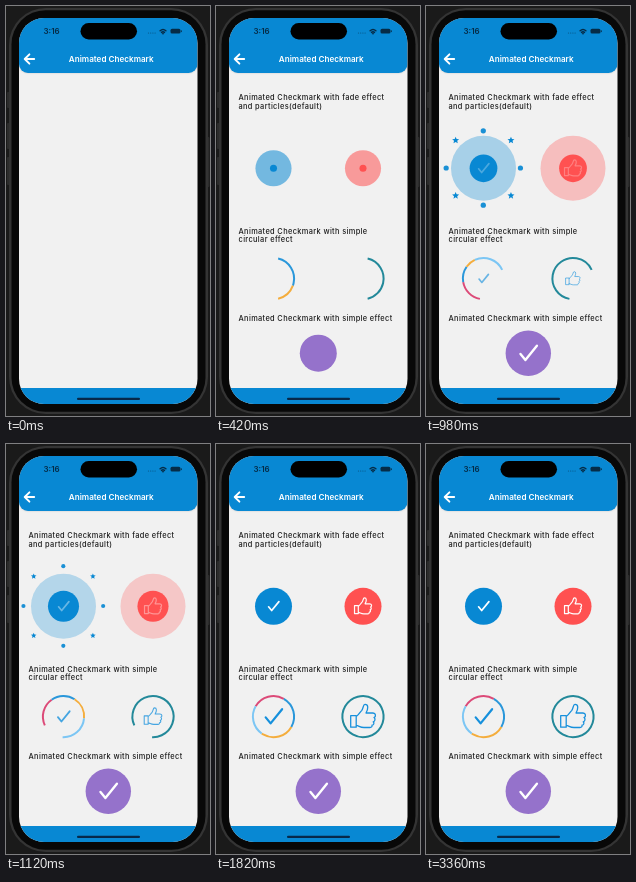
An HTML page with a canvas for the animation above (4.34 s loop, 204 px wide and 410 px high).

```html
<!DOCTYPE html>
<html lang="en">
<head>
<meta charset="utf-8">
<title>Animated Checkmark</title>
<style>
html, body { margin: 0; width: 100%; height: 100%; overflow: hidden; background: #1a1a1a; }
canvas { display: block; width: 204px; height: 410px; filter: blur(.4px); }
</style>
</head>
<body>
<canvas id="stage"></canvas>
<script>
const W = 204, H = 410, LOOP = 4340, STEP = 140, START = 280;
const BLUE = '#0888d3', RED = '#ff5151', PURPLE = '#9572cb', TEAL = '#23899a', ICON = '#1690dc';
const SKY = '#7cc6f4', ORANGE = '#f4ad3d', PINK = '#dc4a78', AZURE = '#2a97da';

const canvas = document.getElementById('stage');
const ctx = canvas.getContext('2d');
const dpr = window.devicePixelRatio || 1;
canvas.width = W * dpr;
canvas.height = H * dpr;

const clamp = v => Math.max(0, Math.min(1, v));
const easeOut = p => 1 - (1 - clamp(p)) ** 2;
const rad = deg => deg * Math.PI / 180;

// Linear interpolation over values spaced 280 ms apart
function track(t, values) {
  const p = clamp((t - 420) / 840) * (values.length - 1);
  const i = Math.min(Math.floor(p), values.length - 2);
  return values[i] + (values[i + 1] - values[i]) * (p - i);
}

function box(x, y, w, h, r, color) {
  ctx.beginPath();
  ctx.roundRect(x, y, w, h, r);
  ctx.fillStyle = color;
  ctx.fill();
}

function disc(x, y, r, color, alpha = 1) {
  if (r <= 0 || alpha <= 0) return;
  ctx.globalAlpha = alpha;
  ctx.beginPath();
  ctx.arc(x, y, r, 0, Math.PI * 2);
  ctx.fillStyle = color;
  ctx.fill();
  ctx.globalAlpha = 1;
}

function label(str, x, y, font, color, spacing = 0, align = 'left') {
  ctx.font = font + ' Inter, Roboto, sans-serif';
  ctx.letterSpacing = spacing + 'px';
  ctx.textAlign = align;
  ctx.fillStyle = color;
  ctx.fillText(str, x, y);
}

function pen(color, width) {
  ctx.strokeStyle = color;
  ctx.lineWidth = width;
  ctx.lineCap = ctx.lineJoin = 'round';
}

const thumb = new Path2D(
  'M-12.3 -1H-6.8V10.6H-12.3Z' +
  'M-6.8 0C-4 -2 -3.4 -4 -1.4 -6C.4 -8 0 -12.2 2 -12.2C5.6 -12.2 5.4 -8 3 -3.6' +
  'H9.6C13 -3.6 13.2 .2 11 1C12.6 2.2 12.2 4.8 10.2 5.2C11.6 6.4 10.8 8.4 9 8.6C9.4 10 8.4 10.9 7 10.9' +
  'H1C-3 10.9 -4 9.2 -6.8 8.8');
const check = new Path2D('M-7.8 .8L-2.9 6.8L8.6 -7.4');

function icon(path, x, y, scale, color, width, alpha) {
  if (scale <= 0 || alpha <= 0) return;
  ctx.save();
  ctx.translate(x, y);
  ctx.scale(scale, scale);
  ctx.globalAlpha = clamp(alpha);
  pen(color, width / scale);
  ctx.stroke(path);
  ctx.restore();
}

function star(x, y, r) {
  ctx.beginPath();
  for (let i = 0; i < 10; i++) {
    const a = rad(i * 36 - 90), d = i % 2 ? r * 0.45 : r;
    ctx.lineTo(x + d * Math.cos(a), y + d * Math.sin(a));
  }
  ctx.closePath();
  ctx.fillStyle = BLUE;
  ctx.fill();
}

function particles(t, x, y) {
  if (t < 560 || t >= 1540) return;
  const dist = 40.2 * easeOut((t - 430) / 760);
  const size = Math.min(3.7, 3.7 - (t - 700) * 0.00386);
  for (let i = 0; i < 8; i++) {
    const a = rad(i * 45);
    if (i % 2) star(x + (dist + 2) * Math.cos(a), y + (dist + 2) * Math.sin(a), size * 1.4);
    else disc(x + dist * Math.cos(a), y + dist * Math.sin(a), size, BLUE, 0.92);
  }
}

function fadeButton(t, x, y, color, path, scale, width) {
  disc(x, y, 32.5 * easeOut((t - START) / 420), color, 0.59 * (1 - (t - START) / 1520));
  disc(x, y, 18.5 * easeOut((t - START) / 1400), color);
  icon(path, x, y, scale, '#fff', width, (t - 650) / 1200);
}

function arc(x, y, from, to, color) {
  if (to <= from) return;
  pen(color, 2);
  ctx.lineCap = 'butt';
  ctx.beginPath();
  ctx.arc(x, y, 20.6, rad(from), rad(to));
  ctx.stroke();
}

// Clockwise edges of the coloured arcs, in degrees
const EDGES = [
  [-77, 15, 100, 210],
  [-77, 75, 170, 300],
  [20, 175, 215, 390],
  [77, 200, 245, 485],
  [77, 200, 335, 570]
];

function ringButton(t, x, y, colors, path) {
  const edges = EDGES.map(e => track(t, e));
  if (colors.length === 1) arc(x, y, edges[0], edges[4], colors[0]);
  else colors.forEach((c, i) => arc(x, y, edges[i], edges[i + 1], c));
  const s = clamp((t - 420) / 980);
  icon(path, x, y, s, ICON, (path === check ? 1.4 : 0.8) * (0.6 + s), s * 1.1);
}

function simpleButton(t, x, y) {
  disc(x, y, t < 560 ? 18.5 : 22.7, PURPLE);
  const p = clamp((t - 560) / 280);
  if (!p) return;
  ctx.save();
  ctx.setLineDash([28 * p, 40]);
  icon(check, x, y, 1, '#fff', 2.4, 1);
  ctx.restore();
}

function phone() {
  ctx.fillStyle = '#1a1a1a';
  ctx.fillRect(0, 0, W, H);
  for (const [x, y, h] of [[1, 86, 16], [1, 117, 26], [1, 151, 28], [201, 131, 50]]) {
    box(x, y, 2.5, h, 1, '#2c2c2c');
  }
  box(3, 2, 199, 406, 37, '#343434');
  box(5.5, 4.2, 194, 401.6, 34, '#080808');
  box(13, 12, 178.5, 386, 25, '#f1f1f1');
}

function chrome() {
  ctx.save();
  ctx.beginPath();
  ctx.roundRect(13, 12, 178.5, 386, 25);
  ctx.clip();
  ctx.shadowColor = 'rgba(0,0,0,.2)';
  ctx.shadowBlur = 2 * dpr;
  box(13, 10, 178.5, 57, [0, 0, 9, 9], BLUE);
  ctx.shadowColor = 'transparent';
  box(13, 382, 178.5, 18, 0, BLUE);
  ctx.restore();

  box(74.5, 17, 56.5, 16.5, 8.2, '#000');
  box(71, 391.7, 63, 2.3, 1.1, '#07294a');
  label('3:16', 37.5, 28, '600 8px', '#062c47');
  for (let i = 0; i < 4; i++) disc(142.5 + i * 2.2, 27, 0.6, '#075382');

  pen('#062c47', 1.5);
  for (const r of [2.2, 4.3]) {
    ctx.beginPath();
    ctx.arc(157, 28, r, rad(-132), rad(-48));
    ctx.stroke();
  }
  disc(157, 27.6, 0.9, '#062c47');
  box(164.5, 22.8, 10, 4.8, 1.6, '#062c47');
  box(175, 24.2, 0.8, 2, 0.4, '#062c47');

  pen('#fff', 1.9);
  ctx.stroke(new Path2D('M28.2 53H19M23.4 48.3L18.7 53L23.4 57.7'));
  label('Animated Checkmark', 105.2, 56, '600 8.15px', '#fff', 0, 'center');
}

function content(t) {
  const lines = [
    ['Animated Checkmark with fade effect', 94],
    ['and particles(default)', 102.8],
    ['Animated Checkmark with simple', 227.6],
    ['circular effect', 236.2],
    ['Animated Checkmark with simple effect', 315.4]
  ];
  for (const [str, y] of lines) label(str, 22.5, y, '500 7.4px', '#1c1c1c', 0.36);
  if (t < 420) return;

  fadeButton(t, 57.5, 162.3, BLUE, check, 0.63, 1.7);
  particles(t, 57.3, 162);
  fadeButton(t, 147, 162.3, RED, thumb, 0.69, 1.2);
  ringButton(t, 57.5, 272.6, [PINK, AZURE, ORANGE, SKY], check);
  ringButton(t, 147, 272.6, [TEAL], thumb);
  simpleButton(t, 102.3, 347.2);
}

function draw(now) {
  const t = Math.floor((now % LOOP) / STEP) * STEP;
  ctx.setTransform(dpr, 0, 0, dpr, 0, 0);
  phone();
  chrome();
  if (t >= START) content(t);
}

let origin;
function tick(now) {
  if (origin === undefined) origin = now;
  draw(Math.max(0, now - origin));
  requestAnimationFrame(tick);
}
draw(0);
requestAnimationFrame(tick);
</script>
</body>
</html>
```
